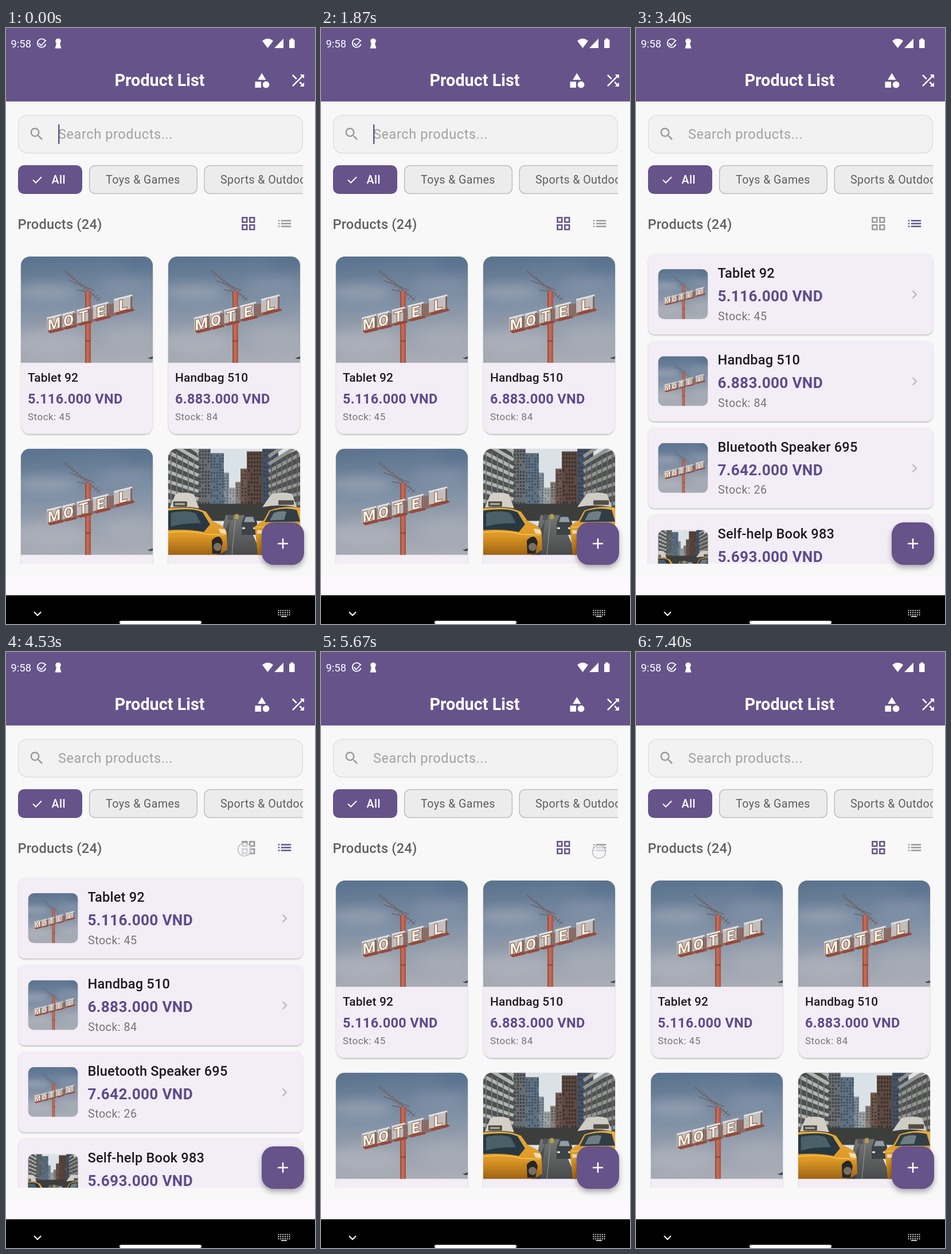
An HTML page that plays this animation: 539 by 1038 pixels, repeating every 7470 ms.

```html
<!DOCTYPE html>
<html lang="en">
<head>
<meta charset="utf-8">
<title>Product List</title>
<style>
  html, body { margin: 0; width: 100%; height: 100%; overflow: hidden; background: #f8f8f8; }
  svg { display: block; }
  #stage { width: 539px; height: 1038px; font-family: Roboto, sans-serif; }
  text { white-space: pre; }
</style>
</head>
<body>
<svg id="stage" viewBox="0 0 539 1038">
  <defs>
    <linearGradient id="sky" x1=".4" y1="0" x2=".5" y2="1">
      <stop offset="0" stop-color="#5c748f"/><stop offset=".35" stop-color="#778aa1"/>
      <stop offset=".7" stop-color="#98a1af"/><stop offset="1" stop-color="#a8adb6"/>
    </linearGradient>
    <linearGradient id="pole">
      <stop offset="0" stop-color="#8f4638"/><stop offset=".4" stop-color="#c9705b"/><stop offset="1" stop-color="#a4523f"/>
    </linearGradient>
    <linearGradient id="road" x1="0" y1="0" x2="0" y2="1">
      <stop offset="0" stop-color="#747675"/><stop offset="1" stop-color="#484a4b"/>
    </linearGradient>
    <linearGradient id="taxi" x1="0" y1="0" x2="0" y2="1">
      <stop offset="0" stop-color="#e9ab3b"/><stop offset=".6" stop-color="#dd9826"/><stop offset="1" stop-color="#9c6213"/>
    </linearGradient>
    <filter id="soft" x="-50%" y="-50%" width="200%" height="200%"><feGaussianBlur stdDeviation="10"/></filter>
    <filter id="lift" x="-20%" y="-20%" width="140%" height="150%">
      <feDropShadow dx="0" dy="1.5" stdDeviation="1.3" flood-color="#000" flood-opacity=".28"/>
    </filter>
    <filter id="float" x="-30%" y="-30%" width="160%" height="170%">
      <feDropShadow dx="0" dy="5" stdDeviation="5" flood-color="#000" flood-opacity=".32"/>
    </filter>
    <clipPath id="page"><rect y="380" width="539" height="553"/></clipPath>
    <clipPath id="chips"><rect x="20" y="235" width="498" height="60"/></clipPath>
    <clipPath id="card"><rect width="230" height="309" rx="15.7"/></clipPath>
    <clipPath id="thumb"><rect width="87" height="87" rx="10.5"/></clipPath>
    <symbol id="motel" viewBox="0 0 230 185" preserveAspectRatio="xMidYMid slice"></symbol>
    <symbol id="city" viewBox="0 0 230 185" preserveAspectRatio="xMidYMid slice"></symbol>
  </defs>
  <g id="app"></g>
</svg>
<script>
const LOOP = 7470;
const PURPLE = '#65538a', GREY = '#9a9a9a', BODY = '#f8f8f8';
const $ = id => document.getElementById(id);

const rect = (x, y, w, h, fill, more = '') =>
  `<rect x="${x}" y="${y}" width="${w}" height="${h}" fill="${fill}" ${more}/>`;
const path = (d, fill, more = '') => `<path d="${d}" fill="${fill}" ${more}/>`;
const line = (d, color, w, more = '') => path(d, 'none', `stroke="${color}" stroke-width="${w}" ${more}`);
const circle = (x, y, r, fill, more = '') => `<circle cx="${x}" cy="${y}" r="${r}" fill="${fill}" ${more}/>`;
const text = (s, x, y, size, weight, fill, gap = 0) =>
  `<text x="${x}" y="${y}" font-size="${size}" font-weight="${weight}" fill="${fill}" letter-spacing="${gap}">${s}</text>`;
// 24-unit icon centred on a point
const icon = (cx, cy, scale, body) =>
  `<g transform="translate(${cx} ${cy}) scale(${scale}) translate(-12 -12)">${body}</g>`;
const photo = (id, w, h) => `<use href="#${id}" width="${w}" height="${h}"/>`;

function random(seed) {
  return () => (seed = (seed * 16807) % 2147483647) / 2147483647;
}

function motel() {
  const cloud = (x, y, rx, ry, c, o) =>
    `<ellipse cx="${x}" cy="${y}" rx="${rx}" ry="${ry}" fill="${c}" opacity="${o}" filter="url(#soft)"/>`;
  let s = rect(0, 0, 230, 185, 'url(#sky)')
    + cloud(45, 62, 55, 13, '#a9aebb', .6) + cloud(180, 50, 45, 12, '#909bae', .5)
    + cloud(50, 150, 65, 22, '#b5b6bd', .6) + cloud(190, 140, 50, 20, '#aeb1ba', .5)
    + cloud(215, 10, 40, 14, '#516c8c', .5);
  // aerial
  s += line('M76 25L138 76M84 42L128 59M98 58L117 61', '#675a59', 1.1);
  for (let i = 0; i < 13; i++) {
    const x = 79 + i * 4.7, y = 27 + i * 3.9, k = 2 + i * .15;
    s += line(`M${x - k} ${y + k}L${x + k} ${y - k}`, '#75635c', 1);
  }
  s += rect(112, 60, 10, 125, 'url(#pole)') + rect(112, 146, 10, 2, '#8a4336');
  // sign: backing strip, then one box per letter with a red underside
  s += path('M48 112L192 73L195 95L52 133Z', '#8b6a64');
  const letters = [['M', 58, 116, 25], ['O', 83, 110, 21], ['T', 109, 103, 23], ['E', 139, 95, 27], ['L', 178, 83, 32]];
  for (const [c, x, y, w] of letters) {
    s += `<g transform="translate(${x} ${y}) skewY(-14)">`
      + path(`M${-w / 2} 10H${w / 2}L${w / 2 + 5} 16H${6 - w / 2}Z`, '#96493a')
      + rect(-w / 2, -13, w, 24, '#c3bebe') + rect(-w / 2, -13, w, 3, '#e0e0e2') + rect(w / 2 - 3, -10, 3, 21, '#7d635c')
      + `<text text-anchor="middle" y="10" font-size="26" font-weight="700" fill="#fff3e2" stroke="#7c5548" stroke-width="2" paint-order="stroke">${c}</text></g>`;
  }
  return s + path('M221 176q5 0 9-3v5h-6z', '#3f4754');
}

function city() {
  const rnd = random(41);
  let s = rect(0, 0, 230, 185, '#dbe2e7');
  const tower = (x, y, w, h, wall, pane, step) => {
    s += rect(x, y, w, h, wall);
    for (let j = y + 3; j < y + h - 3; j += step)
      for (let i = x + 2; i < x + w - 2; i += 5)
        if (rnd() > .2) s += rect(i, j, 3, step * .55, pane);
  };
  tower(95, 42, 11, 80, '#7f8c96', '#5b6975', 5);
  tower(105, 68, 12, 52, '#9ba2a5', '#747c81', 5);
  tower(117, 58, 10, 62, '#857d78', '#5d5a59', 5);
  tower(72, 8, 25, 112, '#5f7081', '#3d4e5e', 5);
  tower(52, 0, 22, 115, '#686c6f', '#3c4146', 6);
  tower(126, 35, 16, 85, '#6b574d', '#453a38', 6);
  tower(137, 5, 30, 108, '#5d4941', '#3a302e', 7);
  tower(164, 0, 28, 100, '#445264', '#333f4f', 7);
  // near façades in perspective
  s += path('M0 0H48L54 20V118H0Z', '#4d5152') + path('M174 42L192 17L230 0V120H174Z', '#4f5151');
  for (let i = 0; i < 9; i++) {
    const y = -28 + i * 17;
    s += line(`M0 ${y}L53 ${y + 34 - i * 3.3}`, '#b4b4ae', 6);
    s += line(`M175 ${y + 42 - i * 4}L230 ${y + 4}`, '#94948f', 6);
  }
  for (let x = 5; x < 52; x += 10) s += line(`M${x} ${x * .4}V112`, '#75787a', 2);
  for (let x = 180; x < 230; x += 9) s += line(`M${x} ${(230 - x) * .6}V112`, '#626465', 2);
  s += path('M0 102L60 96H170L230 102V126H0Z', '#3c3e3c') + path('M100 116H133L163 185H84Z', 'url(#road)')
    + path('M84 185L98 146L108 124L100 185Z', '#3d3f40', 'opacity=".6"')
    + line('M117 124L111 185', '#9b9b95', 1);
  // distant cars
  s += rect(104, 115, 9, 10, '#54585a', 'rx="2"') + rect(116, 114, 7, 9, '#b8994f', 'rx="2"')
    + path('M128 130L133 117H149L155 129V150H128Z', '#3c4246') + path('M132 128L135 119H148L151 128Z', '#929da3')
    + rect(129, 137, 5, 3, '#e8e6dc') + rect(148, 137, 5, 3, '#e8e6dc');
  // left cab
  s += path('M0 104Q44 99 66 110L78 127Q98 133 102 146L103 176L88 185H0Z', 'url(#taxi)')
    + path('M0 108Q43 102 60 111L73 132L62 145Q32 139 0 142Z', '#293840')
    + path('M5 112Q34 106 48 113L57 130Q25 129 5 136Z', '#566c75', 'opacity=".75"')
    + line('M0 146Q40 142 66 149L99 150', '#f1bd50', 2)
    + path('M76 160Q90 145 95 163L91 183H77Z', '#282725') + circle(86, 171, 7, '#777068')
    + path('M88 139L100 141L101 149L91 147Z', '#f1dfb2')
    + path('M3 103L13 79Q31 74 45 80L54 104Q28 99 3 103Z', '#d3cfc6')
    + rect(9, 92, 24, 9, '#4d4b47', 'rx="1"') + rect(12, 95, 17, 3, '#b5afa3');
  // right cab
  s += path('M151 136Q158 128 166 126L176 108Q200 98 230 103V185H156Z', 'url(#taxi)')
    + path('M168 128L178 109Q204 101 224 107L230 127Z', '#303e46')
    + path('M177 125L184 112Q196 107 206 110L202 124Z', '#6d7e85')
    + rect(155, 142, 10, 6, '#f3dfb2', 'rx="2"') + line('M154 137L230 132', '#efba55', 2)
    + path('M164 102L180 79Q200 74 216 79L224 102Q194 96 164 102Z', '#cfccc4')
    + rect(192, 90, 27, 8, '#514f4b', 'rx="1"');
  return s;
}

function statusBar() {
  let s = rect(0, 0, 539, 128, PURPLE) + text('9:58', 8.5, 34, 18.4, 400, '#fff');
  s += line('M68.6 22.5A7.4 7.4 0 1 0 69.4 28M57.5 26.5L61.5 30.5L70 21', '#fff', 1.8);
  s += circle(91, 23, 4.8, '#fff') + path('M88.5 25H93.5L96.5 35.5H85.5Z', '#fff');
  s += path('M447 22.5Q456.5 14.5 466 22.5L456.5 35Z', '#fff') + path('M484 18.5V35H468Z', '#fff');
  s += rect(494, 20, 9.5, 15, '#fff', 'rx="1.5"') + rect(496.5, 18, 4.5, 3, '#fff');
  s += text('Product List', 189.5, 101, 28.8, 600, '#fff');
  s += icon(446.3, 91.5, 1.31, path('M12 2L6.5 11H17.5Z', '#fff') + circle(17.5, 17.5, 4.5, '#fff') + rect(3, 13.5, 8, 8, '#fff'));
  return s + icon(509.5, 91.5, 1.31, path('M10.59 9.17L5.41 4 4 5.41l5.17 5.17zM14.5 4l2.04 2.04L4 18.59 5.41 20 17.96 7.46 20 9.5V4zM14.83 13.41l-1.41 1.41 3.13 3.13L14.5 20H20v-5.5l-2.04 2.04z', '#fff'));
}

function filters() {
  const chip = 'rx="10" stroke="#b7b6bb" stroke-width="1.3"';
  let s = rect(21.6, 152.1, 495.8, 65.8, '#f2f2f2', 'rx="15.7" stroke="#dcdcdc" stroke-width="1.3"');
  s += icon(53.6, 184.8, 1.22, path('M15.5 14h-.79l-.28-.27C15.41 12.59 16 11.11 16 9.5 16 5.91 13.09 3 9.5 3S3 5.91 3 9.5 5.91 16 9.5 16c1.61 0 3.09-.59 4.23-1.57l.27.28v.79l5 4.99L20.49 19zm-6 0C7.01 14 5 11.99 5 9.5S7.01 5 9.5 5 14 7.01 14 9.5 11.99 14 9.5 14z', GREY));
  s += text('Search products...', 91, 193, 23.58, 400, '#a2a2a2', .56);
  s += rect(91, 168, 2.4, 34, PURPLE, 'id="caret"');
  s += rect(21, 239, 112, 50, PURPLE, 'rx="10.5"') + line('M47 264.5L52 269.5L62 259.5', '#fff', 2);
  s += text('All', 79.5, 271, 19.65, 500, '#fff', .4);
  s += '<g clip-path="url(#chips)">' + rect(145.6, 239.6, 187.8, 48.8, '#ececec', chip)
    + text('Toys &amp; Games', 174, 271, 19.65, 400, '#5e5e5e', .4)
    + rect(346.1, 239.6, 230, 48.8, '#ececec', chip)
    + text('Sports &amp; Outdoors', 374, 271, 19.65, 400, '#5e5e5e', .4) + '</g>';
  return s + text('Products (24)', 20.5, 349.5, 23.58, 500, '#616161', .2);
}

function toggles() {
  let squares = '';
  for (const x of [4, 14]) for (const y of [4, 14])
    squares += rect(x, y, 6, 6, 'none', 'stroke="currentColor" stroke-width="2"');
  let rows = '';
  for (const y of [7, 11, 15])
    rows += rect(3, y, 2, 2, 'currentColor') + rect(7, y, 14, 2, 'currentColor');
  return circle(0, 0, 0, PURPLE, 'id="ripple"')
    + `<g id="gridIcon">${icon(422.8, 340.6, 1.29, squares)}</g><g id="listIcon">${icon(486, 340.6, 1.25, rows)}</g>`;
}

const products = [
  ['Tablet 92', '5.116.000 VND', 'Stock: 45', 'motel'],
  ['Handbag 510', '6.883.000 VND', 'Stock: 84', 'motel'],
  ['Bluetooth Speaker 695', '7.642.000 VND', 'Stock: 26', 'motel'],
  ['Self-help Book 983', '5.693.000 VND', 'Stock: 61', 'city']
];

const gridCard = ([name, price, stock, pic], i) =>
  `<g transform="translate(${26 + (i % 2) * 257} ${398 + (i >> 1) * 334.4})">`
  + rect(.3, 0, 229.4, 309, '#f3edf6', 'rx="15.7" filter="url(#lift)"')
  + `<g clip-path="url(#card)">${photo(pic, 230, 185.3)}</g>`
  + text(name, 12, 218, 20.96, 500, '#1b1a1f', .15) + text(price, 12, 255.5, 23.58, 600, '#5d4b8a', .3)
  + text(stock, 12, 285, 17.03, 400, '#757575', .5) + '</g>';

const listRow = ([name, price, stock, pic], i) =>
  `<g transform="translate(0 ${393 + i * 151.4})">`
  + rect(21.5, 0, 496, 140.5, '#f3edf6', 'rx="10.5" filter="url(#lift)"')
  + `<g transform="translate(38.5 27)" clip-path="url(#thumb)">${photo(pic, 87, 87)}</g>`
  + text(name, 142.5, 42, 23.58, 500, '#1b1a1f', .2) + text(price, 142.5, 83, 26.2, 600, '#5d4b8a', .3)
  + text(stock, 143, 115.5, 19.65, 400, '#757575', .5)
  + line('M482.5 64.5L489 71L482.5 77.5', '#b4b1b7', 2) + '</g>';

function bottom() {
  let s = rect(0, 955, 539, 33, '#fcf8fe') + rect(0, 988, 539, 50, '#000');
  s += rect(446, 861, 74, 74, PURPLE, 'rx="21" filter="url(#float)"') + line('M483 889V907M474 898H492', '#fff', 2.5);
  s += line('M49 1017L55 1023L61 1017', '#fff', 2);
  for (let r = 0; r < 3; r++) for (let c = 0; c < 6; c++)
    s += rect(474.5 + c * 3.8, 1013.5 + r * 3.7, 2, 2, '#ddd');
  return s + rect(480, 1024, 10, 1.8, '#ddd') + rect(198, 1032.5, 143, 5.5, '#fff', 'rx="2.7"');
}

$('motel').innerHTML = motel();
$('city').innerHTML = city();
$('app').innerHTML = rect(0, 0, 539, 1038, BODY) + statusBar() + filters() + toggles()
  + `<g clip-path="url(#page)"><g id="grid">${products.map(gridCard).join('')}</g>`
  + `<g id="list">${products.map(listRow).join('')}</g></g>` + bottom()
  + circle(0, 0, 11.4, '#f4f4f8', 'id="touch" fill-opacity=".62" stroke="#b9bac8" stroke-width="1.5"');

const blinks = [[0, 400], [870, 1400], [1870, 2400], [2930, 3400], [3930, 4400], [4930, 5400], [5930, 6400], [6930, 7400]];
const taps = [
  { at: 2600, x: 485, y: 348, view: 'list' },
  { at: 4530, x: 416, y: 344, view: 'grid' },
  { at: 5670, x: 485, y: 348, view: 'list' },
  { at: 6730, x: 428.5, y: 347.5, view: 'grid' }
];
const SWITCH = 135, HOLD = 200, RIPPLE = 670;

const show = (el, on) => el.setAttribute('visibility', on ? 'visible' : 'hidden');
const set = (el, attrs) => { for (const k in attrs) el.setAttribute(k, attrs[k]); };

function draw(t) {
  let view = 'grid', tap = null;
  for (const p of taps) {
    if (t >= p.at) tap = p;
    if (t >= p.at + SWITCH) view = p.view;
  }
  show($('caret'), blinks.some(([a, b]) => t >= a && t < b));
  show($('grid'), view === 'grid');
  show($('list'), view === 'list');
  $('gridIcon').style.color = view === 'grid' ? PURPLE : GREY;
  $('listIcon').style.color = view === 'list' ? PURPLE : GREY;

  const age = tap ? t - tap.at : Infinity;
  show($('touch'), age < HOLD);
  if (age < HOLD) set($('touch'), { cx: tap.x, cy: tap.y });

  const p = (age - SWITCH - 10) / (RIPPLE - SWITCH - 10);
  const live = p > 0 && p < 1;
  show($('ripple'), live);
  if (live) set($('ripple'), {
    cx: tap.view === 'grid' ? 422.8 : 486, cy: 340.6,
    r: 26 * (1 - (1 - p) ** 3), opacity: .08 * Math.sin(Math.PI * p)
  });
}

const start = performance.now();
function tick() {
  draw((performance.now() - start) % LOOP);
  requestAnimationFrame(tick);
}
tick();
</script>
</body>
</html>
```
